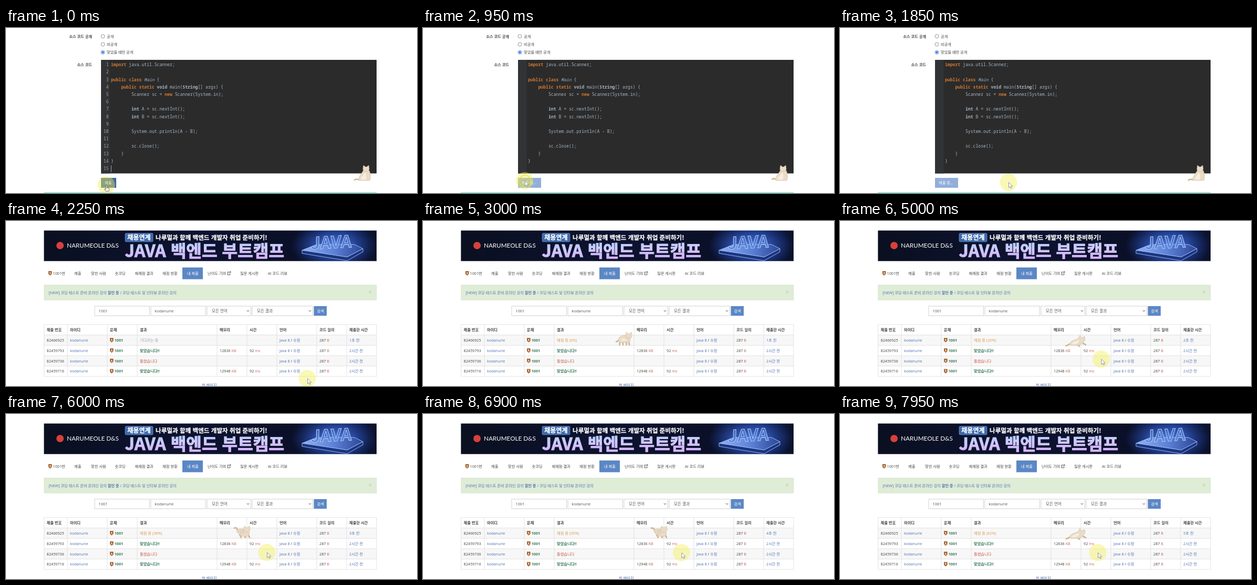
An HTML page for the animation above (8000 ms loop, 783 by 316 pixels).

```html
<!DOCTYPE html>
<html lang="ko">
<head>
<meta charset="utf-8">
<title>제출 현황</title>
<style>
html, body { margin: 0; width: 100%; height: 100%; overflow: hidden; background: #fff; }
svg { display: block; width: 783px; height: 316px; }
text { font: 7.25px 'Open Sans', 'Noto Sans CJK KR', 'Noto Sans CJK', sans-serif; fill: #444; white-space: pre; }
.b { font-weight: 700; }
.link { fill: #4f72b5; }
.ok { fill: #37795a; font-weight: 700; }
.bad { fill: #cb5548; }
.unit { fill: #cf5f57; }
.wait { fill: #a39e9e; }
.run { fill: #d99a50; }
.white { fill: #fff; }
.field { font-size: 7.6px; fill: #555; }
.code { font: 8.12px 'Noto Sans Mono', 'DejaVu Sans Mono', monospace; fill: #a9b7c6; }
.num { fill: #a4a3a3; text-anchor: end; }
.kw { fill: #cc7832; font-weight: 700; }
.it { font-style: italic; }
.ad { font-family: 'Noto Sans CJK KR', 'Noto Sans CJK', sans-serif; font-weight: 700; fill: #fff; stroke: #fff; stroke-width: .25px; }
</style>
</head>
<body>
<svg id="stage" viewBox="0 0 783 316">
  <defs>
    <linearGradient id="sky">
      <stop offset="0" stop-color="#0a1020"/><stop offset=".45" stop-color="#0d1230"/>
      <stop offset=".75" stop-color="#0b1028"/><stop offset=".9" stop-color="#112257"/>
      <stop offset="1" stop-color="#0a1028"/>
    </linearGradient>
    <linearGradient id="lilac" x2=".12" y2="1">
      <stop offset=".2" stop-color="#a9ccfb"/><stop offset=".5" stop-color="#cfcbff"/>
      <stop offset=".85" stop-color="#d3b5fa"/>
    </linearGradient>
    <linearGradient id="neon" x2="0" y2="1">
      <stop offset="0" stop-color="#2f4f9e"/><stop offset="1" stop-color="#6d96e8"/>
    </linearGradient>
    <linearGradient id="slab">
      <stop offset="0" stop-color="#8fb0f2"/><stop offset=".5" stop-color="#5f84d8"/>
      <stop offset="1" stop-color="#2c4696"/>
    </linearGradient>
    <radialGradient id="glow">
      <stop offset="0" stop-color="#5488f0" stop-opacity=".95"/><stop offset=".5" stop-color="#3560cc" stop-opacity=".6"/>
      <stop offset="1" stop-color="#2346b0" stop-opacity="0"/>
    </radialGradient>
    <clipPath id="bannerBox"><path d="M72.3 18.2H706V76.8H72.3Z"/></clipPath>
  </defs>
  <g id="form"></g>
  <g id="status"></g>
  <g id="cat"></g>
  <g id="pointer">
    <circle id="halo" cx="-.5" cy="-.5" r="16.5" fill="#f4ee50" fill-opacity=".42"/>
    <circle id="ring" r="11" fill="none" stroke="#e9dc35" stroke-opacity=".6" stroke-width="2"/>
    <path id="arrow" d="M0 -.3V9.7L2.5 7.5L4.2 11.1L5.8 10.3L4.2 6.9H7.3Z" fill="#fff" stroke="#666c9c" stroke-width=".7"/>
    <path id="hand" d="M-1 1.2Q0 -.2 1 1.2V5L4.5 6Q5.3 6.3 5 8L4.3 11.5H-1.5L-4 7.8Q-4 6.4 -2.6 7L-1 8.3Z" fill="#fff" stroke="#444" stroke-width=".7"/>
  </g>
</svg>
<script>
const LOOP = 8000, SUBMIT = 500, PAGE = 1900, FIRST_PCT = 2870, PCT_STEP = 160;
const $ = id => document.getElementById(id);
const text = (x, y, s, cls = '', extra = '') => `<text x="${x}" y="${y}" class="${cls}" ${extra}>${s}</text>`;
const rect = (x, y, x2, y2, fill, extra = '') =>
  `<rect x="${x}" y="${y}" width="${x2 - x}" height="${y2 - y}" fill="${fill}" ${extra}/>`;
const span = (cls, s) => `<tspan class="${cls}">${s}</tspan>`;
const path = (d, fill, extra = '') => `<path d="${d}" fill="${fill}" ${extra}/>`;

// Submission form
const kw = s => span('kw', s), bold = s => span('b', s);
const code = [
  [0, kw('import') + ' java.util.Scanner;'], null,
  [0, kw('public class ') + span('it', 'Main') + ' {'],
  [4, kw('public static ') + bold('void') + ' main(' + bold('String') + '[] args) {'],
  [8, 'Scanner sc = ' + kw('new') + ' Scanner(System.in);'], null,
  [8, bold('int') + ' A = sc.nextInt();'],
  [8, bold('int') + ' B = sc.nextInt();'], null,
  [8, 'System.out.println(A - B);'], null,
  [8, 'sc.close();'], [4, '}'], [0, '}'], null
];
const lineY = i => 73.2 + i * 14.2;
const radio = (y, label, on) =>
  `<circle cx="184.5" cy="${y}" r="3.5" fill="#fff" stroke="${on ? '#2f6ee0' : '#777'}" stroke-width=".8"/>` +
  (on ? `<circle cx="184.5" cy="${y}" r="2.1" fill="#2f6ee0"/>` : '') + text(192, y + 2.6, label);

$('form').innerHTML =
  text(164, 18.5, '소스 코드 공개', 'b', 'text-anchor="end"') +
  text(164, 73, '소스 코드', 'b', 'text-anchor="end"') +
  radio(15.9, '공개') + radio(31.3, '비공개') + radio(46.6, '맞았을 때만 공개', true) +
  rect(181, 61, 706, 278.5, '#2b2b2b') + rect(181, 61, 197.5, 278.5, '#313335') +
  code.map((c, i) => c ? text(200 + c[0] * 4.87, lineY(i), c[1], 'code') : '').join('') +
  '<g id="before">' + code.map((c, i) => text(195.5, lineY(i), i + 1, 'code num')).join('') +
  rect(199.8, 263, 200.6, 276, '#c8d0d8') +
  rect(181, 287, 210, 306, '#42689f') + text(188, 299, '제출', 'white') + '</g>' +
  '<g id="after">' + rect(181, 287, 225, 306, '#92aed9') + text(188, 299, '제출 중...', 'white') + '</g>' +
  rect(72, 314.2, 706, 316, '#90f0e2');

// Status page
const USER = 'kodanurie';
const badge = (x, y) =>
  path(`M${x} ${y}h6.6v5.6l-3.3 2.8l-3.3 -2.8Z`, '#a5602a') +
  text(x + 1.6, y + 5.9, '5', 'white b', 'style="font-size:5.8px"');

const banner = '<g clip-path="url(#bannerBox)">' + rect(72, 18, 706, 77, 'url(#sky)') +
  '<ellipse cx="625" cy="47" rx="82" ry="44" fill="url(#glow)"/>' +
  path('M564 56L592 45H664L680 53L650 69Z', 'url(#slab)', 'stroke="#a9c6ff" stroke-width=".9"') +
  path('M564 56L650 69L680 53V59L650 76L564 62Z', '#1c3580', 'stroke="#9fc0ff" stroke-width=".9"') +
  text(0, 0, 'JAVA', 'ad', 'transform="translate(580.5 54.5) rotate(-3) skewX(-4)" style="font-size:32px;fill:url(#neon);stroke:#a9c8ff;stroke-width:1.1px"') +
  '<circle cx="103" cy="47" r="7" fill="#d8403c"/>' +
  text(116, 51.3, 'NARUMEOLE D&amp;S', 'white', 'style="font:11.7px Lato,sans-serif"') +
  rect(227, 23.5, 280, 39.8, '#3c6aad', 'rx="2" stroke="#7ea6e0" stroke-width=".6"') +
  text(231.3, 35.8, '채용연계', 'ad', 'style="font-size:12px"') +
  text(285, 35.6, '나루멀과 함께 백엔드 개발자 취업 준비하기!', 'ad', 'style="font-size:11.6px"') +
  text(226.5, 68.5, 'JAVA 백엔드 부트캠프', 'ad', 'style="font-size:32.2px;fill:url(#lilac);stroke:url(#lilac);stroke-width:1px"') + '</g>';

const nav = badge(80.8, 96) + rect(336, 89, 375, 111.5, '#5c87c5') +
  [[89.5, '1001번'], [130, '제출'], [162, '맞힌 사람'], [207.5, '숏코딩'], [245.5, '재채점 결과'], [298, '채점 현황'],
   [345, '내 제출', 'white'], [384, '난이도 기여'], [446, '질문 게시판'], [499, 'AI 코드 리뷰']]
    .map(([x, s, cls]) => text(x, 102.6, s, cls)).join('') +
  path('M425 97.8H422V103H427V100.6M424.3 100.8L428 97M425.6 97H428V99.4', 'none', 'stroke="#444" stroke-width=".9"');

const notice = rect(72.5, 122.5, 706, 151.5, '#dfecd6', 'stroke="#d5e5c8" stroke-width=".6"') +
  text(81.3, 139.6, '[NEW] 코딩 테스트 준비 온라인 강의 ' + bold('할인 중') + ' / 코딩 테스트 및 인터뷰 온라인 강의', 'link') +
  text(690.8, 140.2, '×', '', 'style="font-size:11px;fill:#b9c5b3"');

const box = (x, x2, s, textX = x + 7.3, cls = 'field') =>
  rect(x, 163, x2, 181.5, '#fff', 'stroke="#c6c6c6" stroke-width=".8"') + text(textX, 175.3, s, cls);
const chevron = x => path(`M${x - 2} 171.2l2 2l2 -2`, 'none', 'stroke="#444" stroke-width="1"');
const search = box(169, 273.6, '1001') + box(276, 380.6, USER) +
  box(383, 466.6, '모든 언어', 392) + box(469, 584.6, '모든 결과', 478) + chevron(461) + chevron(579) +
  rect(586.5, 163, 611, 181.5, '#5c87c5') + text(592.5, 175, '검색', 'white');

const colX = [72.5, 117, 193, 250, 402, 459, 516, 592, 649, 706];
const rowY = [198.3, 218.3, 238.2, 258, 277.8, 297.6];
const heads = ['제출 번호', '아이디', '문제', '결과', '메모리', '시간', '언어', '코드 길이', '제출한 시간'];
const runs = [
  [82466925, '', '', ''], [82459793, '맞았습니다!!', 'ok', 12836],
  [82459736, '틀렸습니다', 'bad', ''], [82459716, '맞았습니다!!', 'ok', 12948]
];
const unit = (n, u) => n ? `${n} ` + span('unit', u) : '';
const row = ([id, result, cls, mem], r) => {
  const y = rowY[r + 1] + 12.6;
  const cell = (c, s, k, extra) => text(colX[c] + 5, y, s, k, extra);
  return cell(0, id) + cell(1, USER, 'link') + badge(198, y - 6.9) + text(206.7, y, '1001', 'ok') +
    cell(3, result, cls, r ? '' : 'id="result"') + cell(4, unit(mem, 'KB')) + cell(5, unit(mem && 92, 'ms')) +
    cell(6, span('link', 'Java 8') + ' / ' + span('link', '수정')) + cell(7, unit(287, 'B')) +
    cell(8, '2시간 전', 'link', r ? '' : 'id="age"');
};
const grid = rowY.map(y => `M72.5 ${y}H706`).join('') + colX.map(x => `M${x} 198.3V297.6`).join('');
const table = rect(72.5, rowY[1], 706, rowY[2], '#f7f7f7') + rect(72.5, rowY[3], 706, rowY[4], '#f7f7f7') +
  path(grid, 'none', 'stroke="#dcdcdc" stroke-width=".8"') +
  heads.map((h, c) => text(colX[c] + 5, 211, h, 'b')).join('') + runs.map(row).join('') +
  text(373, 317, '첫 페이지', 'link');

$('status').innerHTML = banner + nav + notice + search + table;

// Cat poses, drawn around the middle of the body
const FUR = '#eadbc6', LIGHT = '#f6eee1', SHADE = '#cdb79a';
const tail = d => path(d, 'none', `stroke="${SHADE}" stroke-width="2.8" stroke-linecap="round"`);
const fur = d => path(d, FUR, `stroke="${SHADE}" stroke-width=".6"`);
const stripes = d => path(d, 'none', `stroke="${SHADE}" stroke-width=".8"`);
const face = (x, y) => fur(`M${x - 6} ${y - 2}l1 -6l4 3h2l4 -3l1 6q0 6 -6 6q-6 0 -6 -6Z`);
const poses = {
  sit: s => tail(`M-3 10C-8 ${14 + s} -12 ${8 + s} ${-16 - s} ${12 + s}`) +
    fur('M-8 13C-9 4 -1 -1 1 -7L12 -6C15 0 15 9 13 13Z') + face(6, -8) +
    path('M-4 11C-3 5 2 2 4 -3C7 2 7 8 5 12Z', LIGHT),
  walk: s => tail(`M-10 2C-13 ${2 + s} -13 6 -15 5`) +
    [-8, -3, 5, 9].map((x, i) => tail(`M${x} 4L${x + (i % 2 ? s : -s)} 11`)).join('') +
    fur('M-11 3C-11 -6 -2 -8 6 -6C12 -5 13 5 9 7H-8Z') + face(9, -5) + path('M-7 3Q-1 -5 5 3Z', LIGHT),
  lie: s => tail(`M-9 5C-13 ${3 + s} -15 8 -18 8`) + tail('M12 2L19 6') + tail('M3 5L7 9') +
    fur('M-12 6C-12 0 -5 -3 4 -5L8 -12L11 -7L17 -10L18 -4L14 3C9 7 -4 9 -12 6Z') +
    path('M-8 5C-5 0 2 -2 7 -3C7 2 1 6 -8 5Z', LIGHT),
  play: s => tail(`M-8 -3C-11 -9 -12 ${-8 + s} -15 -8`) +
    [-5, 3, 11].map(x => tail(`M${x} 4L${x + 3} 10`)).join('') +
    fur('M-11 -3C-8 -8 3 -7 10 -4C16 1 14 8 8 8C0 9 -7 5 -11 -3Z') + face(9, -4) +
    stripes('M-6 -4l-1 5M-2 -5l-1 8M2 -5l-1 9')
};

const catSteps = [[0, 'sit'], [PAGE, null], [2600, 'walk'], [4700, 'lie'], [5900, 'play'], [7400, 'lie']];
const spots = { sit: [680, 279], lie: [449, 231], play: [450, 226.5] };
const trail = [
  [0, 191.5, 301], [500, 191.5, 301], [850, 194.3, 293], [1650, 194.3, 293], [2250, 574, 302], [2550, 719, 306],
  [2900, 719, 340], [3800, 640, 340], [4250, 587, 265], [5000, 498, 265], [5900, 498, 265.5],
  [6900, 492.8, 266], [LOOP, 491.5, 266]
];
const show = (id, on) => $(id).style.display = on ? '' : 'none';

function pointerAt(t) {
  const i = trail.findIndex(p => p[0] > t), [t0, x0, y0] = trail[i - 1], [t1, x1, y1] = trail[i];
  const k = (t - t0) / (t1 - t0);
  return [x0 + (x1 - x0) * k, y0 + (y1 - y0) * k];
}

function drawCat(t) {
  const pose = catSteps.filter(s => s[0] <= t).pop()[1];
  show('cat', pose);
  if (!pose) return;
  const [x, y] = spots[pose] || [407 + (t - 3700) * .034, 226];
  $('cat').setAttribute('transform', `translate(${x} ${y})`);
  $('cat').innerHTML = poses[pose](Math.sin(t / 200) * 1.3);
}

function render(t) {
  show('form', t < PAGE);
  show('status', t >= PAGE);
  show('before', t < SUBMIT);
  show('after', t >= SUBMIT);

  const judging = t >= FIRST_PCT;
  $('result').textContent = judging ? `채점 중 (${2 * Math.floor((t - FIRST_PCT) / PCT_STEP)}%)` : '기다리는 중';
  $('result').setAttribute('class', judging ? 'run' : 'wait');
  $('age').textContent = `${Math.max(1, Math.floor((t - 2150) / 1000))}초 전`;

  $('pointer').setAttribute('transform', `translate(${pointerAt(t)})`);
  show('hand', t < SUBMIT);
  show('arrow', t >= SUBMIT);
  show('ring', t >= 800 && t < 1150);
  drawCat(t);
}

const start = performance.now();
function tick() {
  render((performance.now() - start) % LOOP);
  requestAnimationFrame(tick);
}
tick();
</script>
</body>
</html>
```
